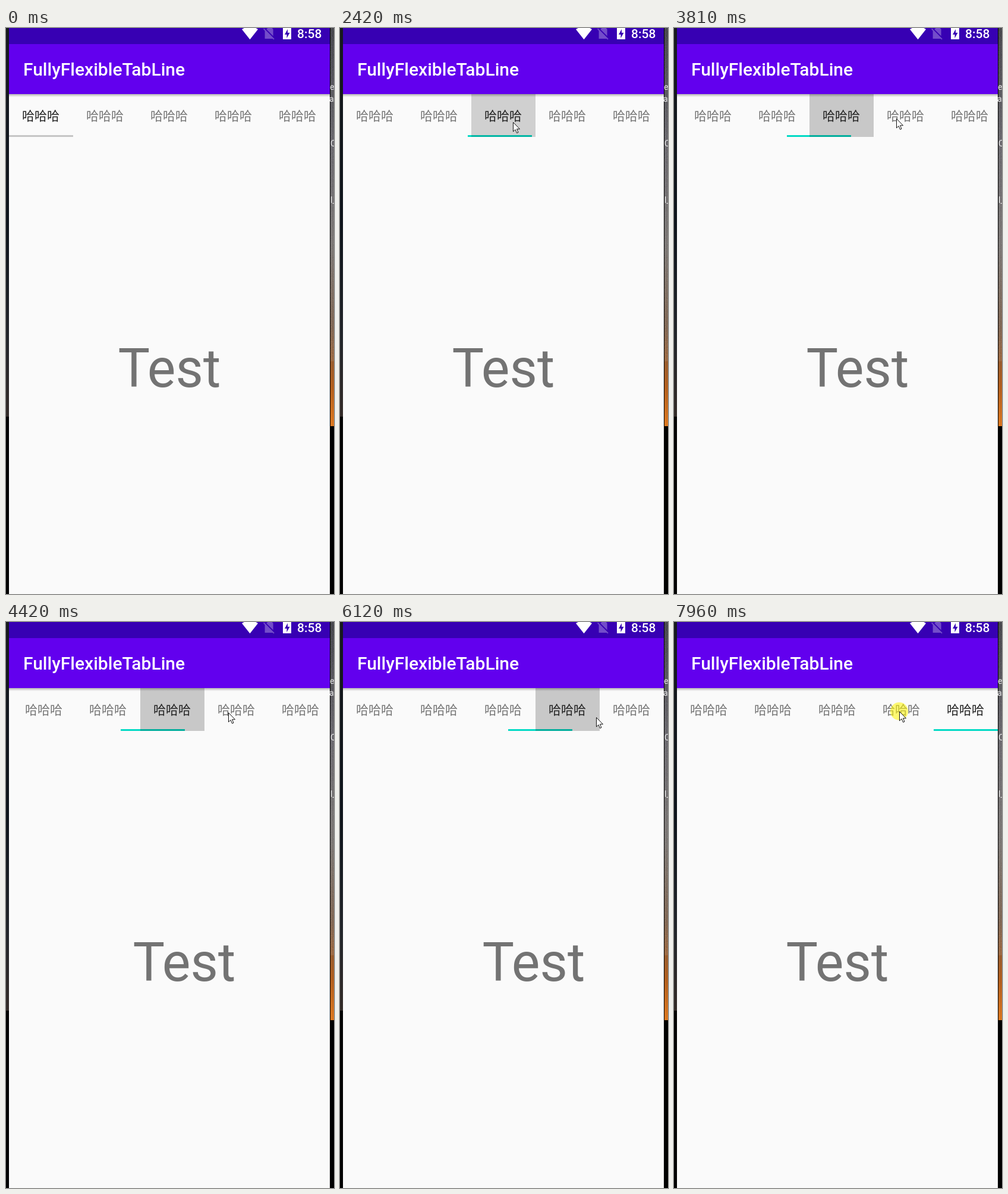
These frames come from a looping animation (552 by 951 pixels, 8000 ms). An HTML page:

```html
<!DOCTYPE html>
<html lang="zh">
<head>
<meta charset="utf-8">
<title>Tab strip</title>
<style>
  html, body { margin: 0; width: 100%; height: 100%; overflow: hidden; background: #000; }
  svg { display: block; width: 100%; height: 100%; }
  text { font-family: Roboto, sans-serif; }
  .bold { font-weight: 500; fill: #fff; }
  .page { font-size: 90px; fill: #737373; text-anchor: middle; }
  .tab { font: 21px "Noto Sans CJK SC", "Noto Sans CJK", sans-serif; fill: #757575; }
  .tab.on { fill: #212121; }
  .desk { font-size: 14px; fill: #e8e8e8; }
</style>
</head>
<body>
<svg viewBox="0 0 552 951">
  <defs>
    <linearGradient id="left" x2="0" y2="1">
      <stop offset="0" stop-color="#171a1d"/><stop offset=".5" stop-color="#0e141b"/>
      <stop offset=".8" stop-color="#22252a"/><stop offset="1" stop-color="#332b28"/>
    </linearGradient>
    <linearGradient id="right" x2="0" y2="1">
      <stop offset="0" stop-color="#34343a"/><stop offset=".3" stop-color="#5f5d63"/>
      <stop offset=".55" stop-color="#726d6a"/><stop offset=".75" stop-color="#775a44"/>
      <stop offset=".9" stop-color="#b25f1e"/><stop offset="1" stop-color="#dc7820"/>
    </linearGradient>
    <linearGradient id="shade" x2="0" y2="1">
      <stop offset="0" stop-opacity=".28"/><stop offset="1" stop-opacity="0"/>
    </linearGradient>
    <filter id="grain" x="0" y="0" width="1" height="1">
      <feTurbulence type="fractalNoise" baseFrequency=".8" numOctaves="2" seed="4"/>
      <feColorMatrix type="saturate" values="0"/>
    </filter>
    <clipPath id="phone"><rect x="5" width="540" height="951"/></clipPath>
    <clipPath id="cell"><rect y="111" width="108" height="72"/></clipPath>
  </defs>

  <rect width="552" height="951"/>
  <rect width="5" height="653" fill="url(#left)"/>
  <rect x="546" width="6" height="669" fill="url(#right)"/>
  <rect x="546" width="6" height="560" filter="url(#grain)" opacity=".3"/>
  <text class="desk" x="545" y="104">e</text>
  <text class="desk" x="544" y="124">ar</text>
  <text class="desk" x="546" y="199">C</text>
  <text class="desk" x="546" y="294">l_</text>

  <g clip-path="url(#phone)">
    <rect x="5" width="540" height="951" fill="#fafafa"/>
    <text class="page" id="oldPage" y="603">Test</text>
    <text class="page" id="newPage" y="603">Test</text>
    <g id="strip">
      <rect id="grayLine" y="180" height="3" fill="#c5c5c5"/>
      <rect id="tealLine" y="180" height="3" fill="#03dac5"/>
      <g id="ripple" clip-path="url(#cell)">
        <rect id="wash" y="111" width="108" height="72"/>
        <circle id="wave"/>
      </g>
    </g>
    <rect x="5" y="111" width="540" height="5" fill="url(#shade)"/>
    <rect x="5" width="540" height="27" fill="#3700b3"/>
    <rect x="5" y="27" width="540" height="84" fill="#6200ee"/>
    <text class="bold" x="29" y="80" font-size="30">FullyFlexibleTabLine</text>
    <path d="M397 2.300Q411 -7 424 2.300L410.500 19.200Z" fill="#fff"/>
    <path d="M449.600 1.900L447.600 0H440.600L438.300 2.200L449.600 13.600ZM434.300 .8L433 2L435.600 4.700V17.900H448.600L450.500 19.500L451.700 18.300Z" fill="#fff" opacity=".3"/>
    <path d="M466 -2H480V19H466Z" fill="#fff"/>
    <path d="M474 2L469 11H472.500V17L477.500 8H474Z" fill="#3700b3"/>
    <text class="bold" x="490" y="17" font-size="21">8:58</text>
  </g>

  <g id="cursor">
    <circle id="click" r="15" fill="#fff500" fill-opacity=".55"/>
    <path d="M.5 .5V16L4 12.700L6.600 18.500L9 17.400L6.500 11.800H11.500Z" fill="#fff" stroke="#111"/>
  </g>
</svg>
<script>
const LOOP = 8000, TICK = 77, FIRST = 330, TAB = 108, PAGE = 540, TABS = 9;

// Tab changes: start time, touch point (x within the tab, y on the stage)
const changes = [
  [1242, 55, 165], [2240, 54, 160], [3143, 47, 150], [3710, 46, 151],
  [4319, 45, 152], [5404.3, 97, 159], [6030, 97, 159], [6632, 22, 168]
];
const presses = [1100, 2024, 2870, 3487, 4103, 5181, 5874, 6490, 7953];

// Pointer path: time, x, y
const path = [
  [330, 473, 831], [1095, 168, 165], [1440, 168, 165], [2010, 275, 160],
  [2260, 275, 160], [2860, 376, 150], [3410, 376, 150], [3640, 374, 152],
  [4480, 374, 152], [5100, 426, 159], [6030, 426, 159], [6340, 459, 168],
  [6800, 459, 168], [7183, 434, 742], [7260, 434, 742], [7720, 342, 230],
  [7950, 379, 150]
];

const $ = id => document.getElementById(id);
const clamp = (v, lo = 0, hi = 1) => Math.min(hi, Math.max(lo, v));
const mix = (a, b, k) => a + (b - a) * k;
const set = (id, attrs) => {
  for (const name in attrs) $(id).setAttribute(name, attrs[name]);
};
const glide = ms => 1 - (1 - clamp(ms / 200)) ** 5;
const scrollFor = tab => clamp(tab - 2, 0, TABS - 5) * TAB;

const labels = Array.from({ length: TABS }, (_, i) => {
  const label = document.createElementNS($("strip").namespaceURI, "text");
  label.textContent = "哈哈哈";
  label.setAttribute("x", i * TAB + 22);
  label.setAttribute("y", 155);
  $("strip").append(label);
  return label;
});

function pointer(t) {
  const i = path.findIndex(p => p[0] > t);
  if (i < 0) return path[path.length - 1].slice(1);
  if (i === 0) return path[0].slice(1);
  const [a, b] = [path[i - 1], path[i]];
  const k = (t - a[0]) / (b[0] - a[0]);
  const eased = k * k * (3 - 2 * k);
  return [mix(a[1], b[1], eased), mix(a[2], b[2], eased)];
}

// The ripple grows from the touch point while drifting to the tab's centre.
function drawRipple(tab, age, [, x, y]) {
  const radius = Math.min(66, 20.5 + .8 * age);
  const k = clamp((radius - 24) / 42);
  const fade = 1 - clamp((age - 135) / 177);
  set("ripple", { transform: `translate(${tab * TAB})` });
  set("wash", { opacity: Math.min(.09, .02 + .001 * age) * fade });
  set("wave", { cx: mix(x, 54, k), cy: mix(y, 147, k), r: radius, opacity: .12 * fade });
}

function draw(t) {
  const tab = changes.filter(c => c[0] <= t).length;
  const change = changes[tab - 1];
  const age = change ? t - change[0] : LOOP;
  const from = Math.max(0, tab - 1);
  const slide = glide(age);

  set("oldPage", { x: 275 - Math.round(PAGE * slide) });
  set("newPage", { x: 275 + Math.round(PAGE * (1 - slide)) });

  const scroll = mix(scrollFor(from), scrollFor(tab), age < 12 ? 0 : slide);
  set("strip", { transform: `translate(${5 - Math.round(scroll)})` });
  labels.forEach((label, i) => label.setAttribute("class", i === tab ? "tab on" : "tab"));

  // The line trails the page; it is gray only under the first tab.
  const line = Math.round(mix(from, tab, glide((age - 23.6) * .614)) * TAB);
  const split = Math.max(line, TAB);
  set("grayLine", { x: line, width: split - line });
  set("tealLine", { x: split, width: line + TAB - split });

  $("ripple").style.display = change ? "" : "none";
  if (change) drawRipple(tab, age, change);

  const [x, y] = pointer(t).map(Math.round);
  $("cursor").style.display = t < FIRST ? "none" : "";
  set("cursor", { transform: `translate(${x} ${y})` });
  $("click").style.display = presses.some(p => t >= p && t < p + TICK) ? "" : "none";
}

function frame() {
  const t = performance.now() % LOOP;
  draw(FIRST + Math.floor((t - FIRST) / TICK) * TICK);
  requestAnimationFrame(frame);
}
frame();
</script>
</body>
</html>
```
